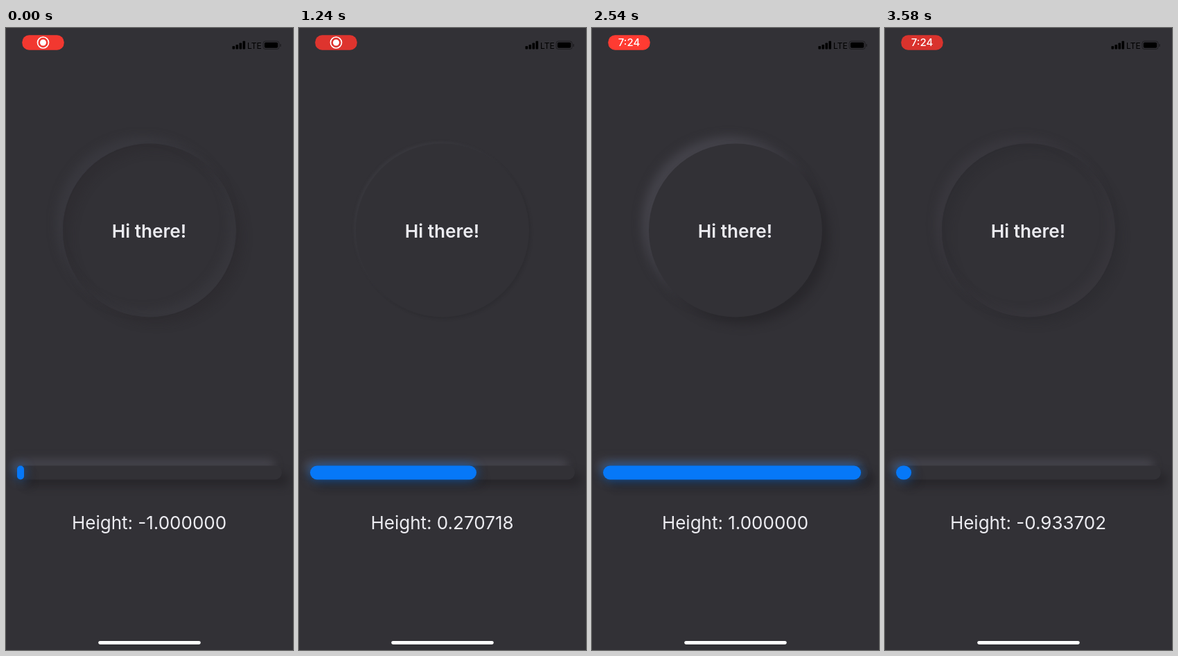
An HTML page with a canvas for the animation above (3.63 s loop, 414 px wide and 896 px high).

```html
<!DOCTYPE html>
<html lang="en">
<head>
<meta charset="utf-8">
<title>Height slider</title>
<style>
html, body { margin: 0; width: 100%; height: 100%; overflow: hidden; background: #323136; }
canvas { display: block; }
</style>
</head>
<body>
<canvas id="stage" width="414" height="896"></canvas>
<script>
const ctx = document.getElementById('stage').getContext('2d');
const LOOP = 3630;
const BG = '#323136', BLUE = '#0678f8', TEXT = '#ebebf0';
const FONT = 'Inter, Roboto, sans-serif';
const FAR = 2000;
const disc = { x: 207, y: 291.5, r: 125 };

// Slider drag: [time, height]
const keys = [
  [0, -1], [540, -0.754144], [1240, 0.270718], [1640, 0.895028], [2100, 0.983],
  [2440, 1], [2575, 1], [2650, 0.88], [3180, -0.162983], [3580, -0.933702]
];
const secants = keys.slice(1).map((k, i) => (k[1] - keys[i][1]) / (k[0] - keys[i][0]));
const slopes = keys.map((k, i) => {
  if (i === 0) return 0;
  if (i === keys.length - 1) return secants[i - 1];
  const a = secants[i - 1], b = secants[i];
  return a * b <= 0 ? 0 : 2 * a * b / (a + b);
});

const clamp = v => Math.max(0, Math.min(1, v));

function heightAt(t) {
  let i = 0;
  while (i < keys.length - 2 && t >= keys[i + 1][0]) i++;
  const [t0, a] = keys[i], [t1, b] = keys[i + 1];
  const d = t1 - t0, u = clamp((t - t0) / d), v = 1 - u;
  return a * v * v * (1 + 2 * u) + b * u * u * (3 - 2 * u)
    + d * u * v * (slopes[i] * v - slopes[i + 1] * u);
}

// The picture refreshes every 50 ms, with one longer hold at the top.
function tick(t) {
  if (t < 40) return 0;
  if (t < 2540) return 40 + Math.floor((t - 40) / 50) * 50;
  if (t < 2630) return 2540;
  return 2630 + Math.floor((t - 2630) / 50) * 50;
}

const light = a => `rgba(70,69,77,${a})`;
const dark = a => `rgba(37,36,40,${a})`;

function circlePath(c, dx = 0) {
  const p = new Path2D();
  p.arc(c.x + dx, c.y, c.r, 0, Math.PI * 2);
  return p;
}

function barPath(x, y, w, h, r = h / 2) {
  const p = new Path2D();
  p.roundRect(x, y, w, h, Math.min(r, w / 2));
  return p;
}

function fill(path, color) {
  ctx.fillStyle = color;
  ctx.fill(path);
}

// Paints only the shadow of a path that lies FAR to the left.
function castShadow(path, color, offset, sigma) {
  ctx.save();
  ctx.shadowColor = color;
  ctx.shadowBlur = sigma * 2;
  ctx.shadowOffsetX = FAR + offset;
  ctx.shadowOffsetY = offset;
  ctx.fillStyle = '#000';
  ctx.fill(path, 'evenodd');
  ctx.restore();
}

function drawDisc(h) {
  const depth = Math.abs(h), d = 10 * depth, sigma = 7 * depth;
  const alpha = h > 0 ? Math.pow(depth, 0.8) * 0.9 : depth * 0.36;
  const away = circlePath(disc, -FAR);
  const face = circlePath(disc);
  castShadow(away, light(alpha), -d, sigma);
  castShadow(away, dark(alpha * 0.8), d, sigma);
  fill(face, BG);
  if (h >= 0) return;
  const rim = new Path2D();
  rim.rect(disc.x - 200 - FAR, disc.y - 200, 400, 400);
  rim.addPath(away);
  ctx.save();
  ctx.clip(face);
  castShadow(rim, light(alpha * 0.75), -d, sigma);
  castShadow(rim, dark(alpha * 0.65), d, sigma);
  ctx.restore();
}

function drawSlider(h) {
  const x = 16, y = 630.5, w = 382, tall = 20;
  const away = barPath(x - FAR, y, w, tall);
  castShadow(away, light(0.85), -10, 6);
  castShadow(away, dark(0.75), 10, 6);
  fill(barPath(x, y, w, tall), BG);
  const done = 10 + (h + 1) * 181;
  const awayFill = barPath(x - FAR, y, done, tall);
  castShadow(awayFill, dark(0.3), 10, 6);
  castShadow(awayFill, 'rgba(6,120,248,0.62)', 0, 7.5);
  fill(barPath(x, y, done, tall), BLUE);
}

function label(text, x, y, size, weight, color, align = 'center') {
  ctx.font = `${weight} ${size}px ${FONT}`;
  ctx.textAlign = align;
  ctx.fillStyle = color;
  ctx.fillText(text, x, y);
}

function drawPill(t) {
  const glow = (1 + Math.cos((t - 420) / 2120 * Math.PI * 2)) / 2;
  const mix = (a, b) => Math.round(a + (b - a) * glow);
  fill(barPath(23.3, 10.2, 60.4, 21.6, 10), `rgb(${mix(217, 255)},${mix(51, 59)},${mix(45, 50)})`);
  const swap = clamp((t - 1540) / 400);
  ctx.save();
  ctx.globalAlpha = swap;
  label('7:24', 53.5, 26.3, 15, 500, '#fff');
  ctx.globalAlpha = 1 - swap * swap;
  ctx.strokeStyle = '#fff';
  ctx.lineWidth = 1.7;
  ctx.stroke(circlePath({ x: 53.5, y: 21, r: 8 }));
  fill(circlePath({ x: 53.5, y: 21, r: 4.5 }), '#fff');
  ctx.restore();
}

function drawStatus() {
  [4.5, 6.5, 9, 11.8].forEach((tall, i) =>
    fill(barPath(326.5 + i * 5, 30.5 - tall, 3.6, tall, 0.8), '#000'));
  label('LTE', 348, 29.5, 12, 400, '#000', 'left');
  ctx.strokeStyle = 'rgba(0,0,0,0.4)';
  ctx.lineWidth = 1;
  ctx.stroke(barPath(371, 19, 23, 11.5, 3.2));
  fill(barPath(372.8, 20.8, 19.4, 7.9, 1.8), '#000');
  fill(barPath(395.3, 23, 1.4, 4, 0.7), 'rgba(0,0,0,0.45)');
}

function draw(t) {
  const h = heightAt(t);
  ctx.fillStyle = BG;
  ctx.fillRect(0, 0, 414, 896);
  drawDisc(h);
  label('Hi there!', 206.5, 301.6, 26.2, 600, TEXT);
  drawSlider(h);
  label('Height: ' + h.toFixed(6), 206.5, 722, 26, 400, TEXT);
  drawPill(t);
  drawStatus();
  fill(barPath(133.2, 883.1, 147.6, 4.8), '#fff');
}

const start = performance.now();
function frame() {
  draw(tick((performance.now() - start) % LOOP));
  requestAnimationFrame(frame);
}
frame();
</script>
</body>
</html>
```
